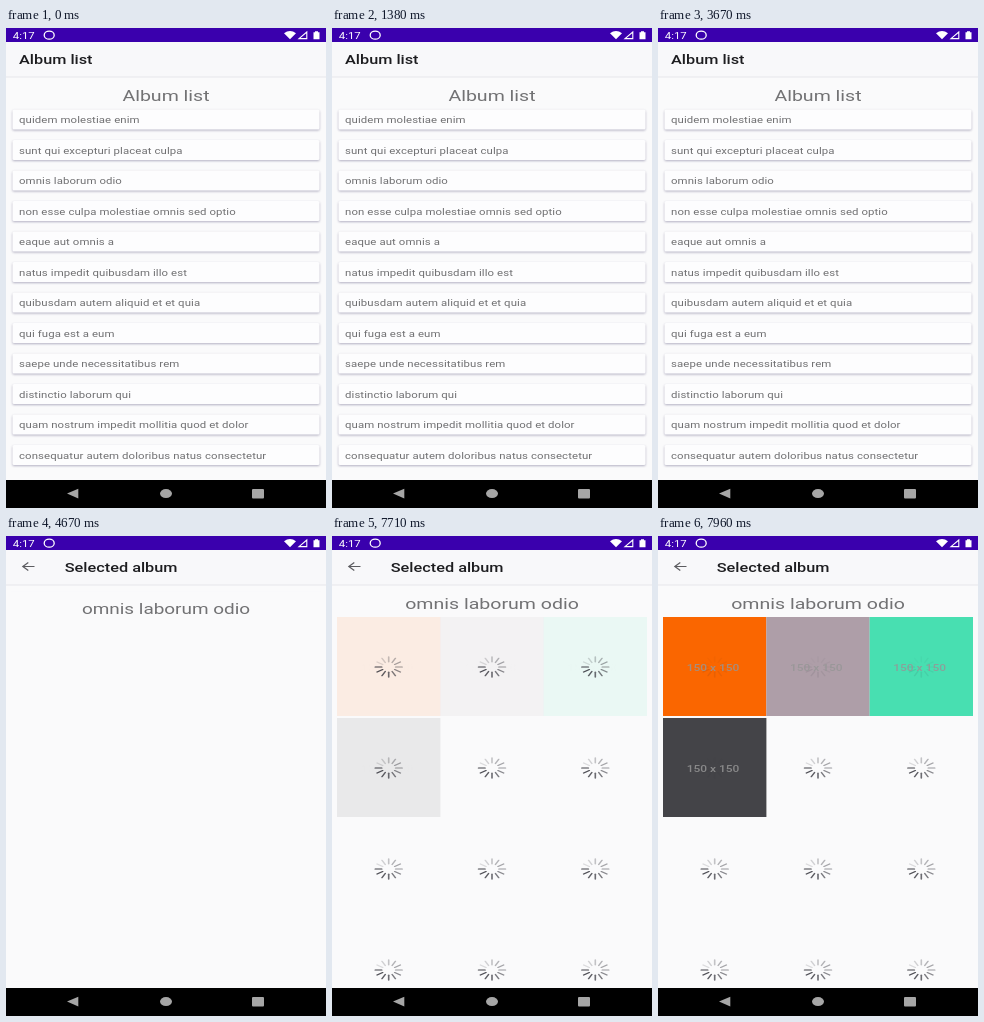
An HTML page that plays this animation: 320x480 px, repeating every 8000 ms.

```html
<!DOCTYPE html>
<html lang="en">
<head>
<meta charset="utf-8">
<title>Album list</title>
<style>
  html, body { margin: 0; width: 100%; height: 100%; overflow: hidden; background: #fafafb; }
  svg { display: block; width: 100vw; height: 100vh; }
  text { font-family: Roboto, "Noto Sans", sans-serif; }
  #cards { filter: drop-shadow(0 1.2px 1px rgba(70, 65, 110, .4)); }
</style>
</head>
<body>
<svg id="stage" viewBox="0 0 320 480" preserveAspectRatio="none">
  <rect width="320" height="480" fill="#fafafb"/>
  <g id="list"><g id="cards"></g></g>
  <g id="detail">
    <rect y="49" width="320" height="403" fill="#fafafb"/>
    <g id="grid"></g>
  </g>

  <rect y="14" width="320" height="35" fill="#f8f8fa"/>
  <rect y="48.5" width="320" height="1" fill="#e8e8ec"/>
  <g id="listBar"></g>
  <g id="detailBar">
    <path d="M28.5 30.5H17M22.3 26.4L16.8 30.5L22.3 34.6" fill="none" stroke="#5c5c60" stroke-width="1.2"/>
  </g>

  <g id="status">
    <rect width="320" height="14" fill="#3a00ad"/>
    <ellipse cx="43.2" cy="7.2" rx="5" ry="4" fill="none" stroke="#fff" stroke-width="1.3"/>
    <path d="M278 5.2Q284 1 290 5.2L284 11.2Z" fill="#fff"/>
    <path d="M293 10.6L300.8 4V10.6Z" fill="none" stroke="#fff" stroke-width="1.1"/>
    <path d="M307.5 4.2H309V3.2H312V4.2H313.5V11.3H307.5Z" fill="#fff"/>
  </g>

  <rect y="452" width="320" height="28" fill="#000"/>
  <g fill="#a6a6a6">
    <path d="M61 465.6L72.3 460.8V470.5Z"/>
    <ellipse cx="160" cy="465.6" rx="6" ry="4.5"/>
    <rect x="246" y="461" width="12" height="9.4" rx="1"/>
  </g>
</svg>
<script>
const LOOP = 8000;
const OPEN = 4500, OPEN_MS = 420;
const LOAD = 7710, LOAD_MS = 250;
// A 393 x 786 dp phone screen squeezed onto the stage
const SX = 320 / 393, SY = 480 / 786;

const $ = id => document.getElementById(id);
const clamp = v => Math.max(0, Math.min(1, v));
const easeOut = p => 1 - (1 - p) ** 3;

function add(parent, tag, attrs, content) {
  const el = document.createElementNS("http://www.w3.org/2000/svg", tag);
  for (const k in attrs) el.setAttribute(k, attrs[k]);
  if (content) el.textContent = content;
  parent.appendChild(el);
  return el;
}

function label(parent, content, x, y, size, fill, extra) {
  return add(parent, "text", {
    transform: `translate(${x} ${y}) scale(${SX} ${SY})`,
    "font-size": size, fill, ...extra
  }, content);
}

const middle = { "text-anchor": "middle" };
const medium = { "font-weight": 500 };

label($("status"), "4:17", 6.8, 10.5, 14, "#fff");
label($("listBar"), "Album list", 13, 35.6, 20, "#1d1d20", medium);
label($("detailBar"), "Selected album", 58.8, 35.6, 20, "#1d1d20", medium);
label($("list"), "Album list", 160, 72.6, 24, "#727274", middle);
label($("detail"), "omnis laborum odio", 160, 72.6, 24, "#727274", middle);

[
  "quidem molestiae enim",
  "sunt qui excepturi placeat culpa",
  "omnis laborum odio",
  "non esse culpa molestiae omnis sed optio",
  "eaque aut omnis a",
  "natus impedit quibusdam illo est",
  "quibusdam autem aliquid et et quia",
  "qui fuga est a eum",
  "saepe unde necessitatibus rem",
  "distinctio laborum qui",
  "quam nostrum impedit mollitia quod et dolor",
  "consequatur autem doloribus natus consectetur"
].forEach((name, i) => {
  const y = i * 30.5;
  add($("cards"), "rect", { x: 6.5, y: 81.5 + y, width: 307, height: 20, rx: 1.5, fill: "#fdfdfe" });
  label($("list"), name, 13, 95 + y, 14, "#707072", { "letter-spacing": .12 });
});

function spinner(parent, x, y) {
  const g = add(parent, "g", {
    transform: `translate(${x} ${y}) scale(${SX} ${SY})`,
    stroke: "#2e2e36", "stroke-width": 2, "stroke-linecap": "round"
  });
  for (let i = 0; i < 12; i++) {
    add(g, "line", {
      x1: 8.5, x2: 16.5, transform: `rotate(${180 - i * 30})`,
      opacity: Math.max(.15, .9 - i * .07)
    });
  }
  return g;
}

const tiles = ["#fa6600", "#ae9ea8", "#48dfb1", "#444448"];
const photos = [];
for (let i = 0; i < 12; i++) {
  const x = 5 + (i % 3) * 103.3, y = 81 + Math.floor(i / 3) * 101;
  const fill = tiles[i];
  const rect = fill && add($("grid"), "rect", { x, y, width: 103.4, height: 99, fill });
  const spin = spinner($("grid"), x + 51.7, y + 50);
  if (fill) {
    const caption = label($("grid"), "150 x 150", x + 50, y + 54.3, 14.7, "#969696", { ...middle, ...medium });
    photos.push({ rect, spin, caption });
  }
}

function zoom(el, s) {
  el.setAttribute("transform", `translate(160 250) scale(${s}) translate(-160 -250)`);
}

function render(t) {
  const open = easeOut(clamp((t - OPEN) / OPEN_MS));
  const shown = clamp(open * 1.6);
  zoom($("list"), 1 + .1 * open);
  zoom($("detail"), .85 + .15 * open);
  $("list").setAttribute("opacity", 1 - shown);
  $("detail").setAttribute("opacity", shown);
  $("listBar").setAttribute("opacity", 1 - shown);
  $("detailBar").setAttribute("opacity", shown);

  $("grid").setAttribute("visibility", t >= LOAD ? "visible" : "hidden");
  const load = clamp((t - LOAD) / LOAD_MS);
  for (const { rect, spin, caption } of photos) {
    rect.setAttribute("opacity", .09 + .91 * load);
    spin.setAttribute("opacity", 1 - .87 * load);
    caption.setAttribute("opacity", .85 * load);
  }
}

const start = performance.now();
function tick() {
  render((performance.now() - start) % LOOP);
  requestAnimationFrame(tick);
}
tick();
</script>
</body>
</html>
```
